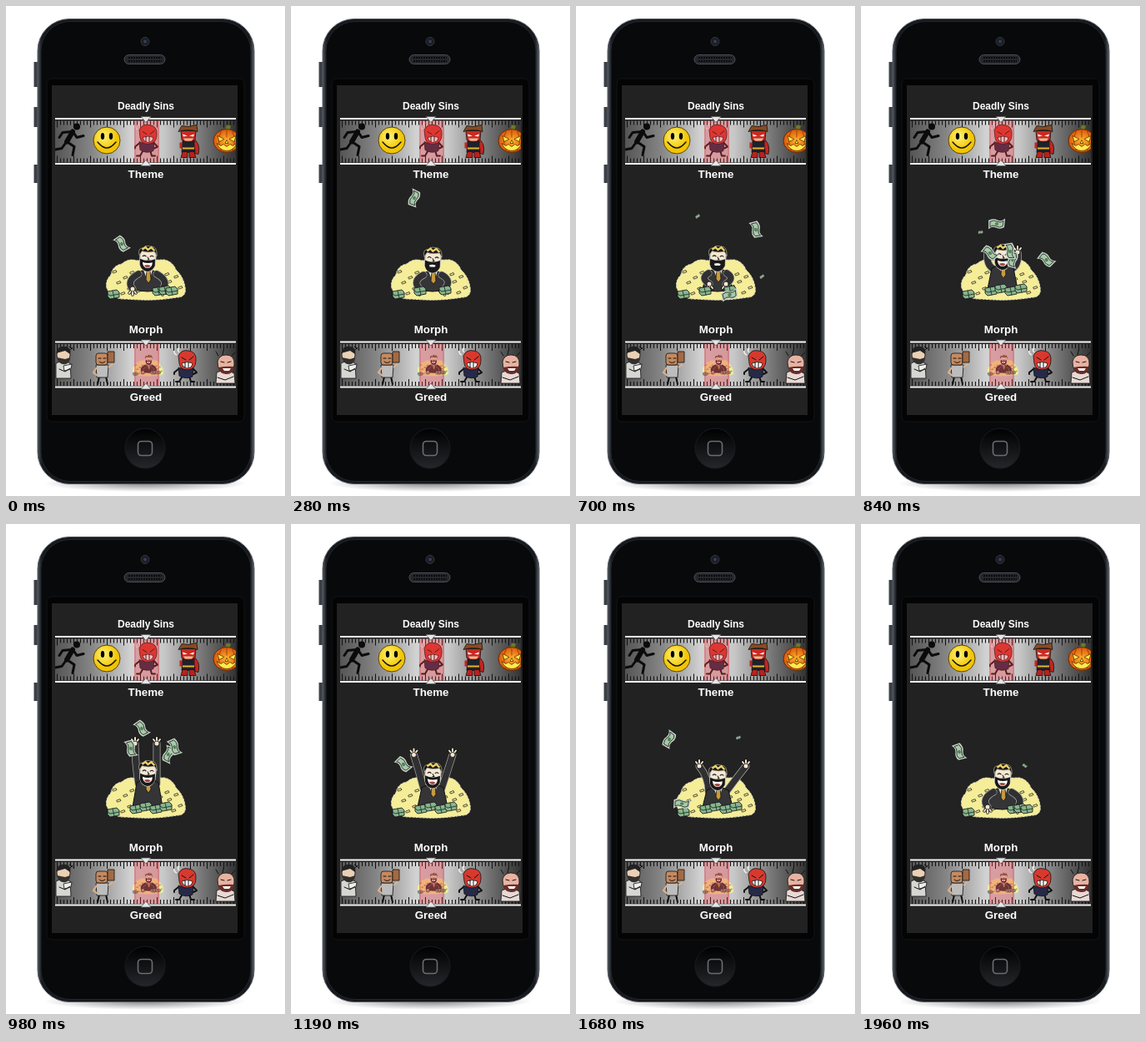
Write an HTML page that moves like this. It is 335x587 px and loops after 2.03 s.

```html
<!DOCTYPE html>
<html lang="en">
<head>
<meta charset="utf-8">
<title>Theme and morph picker</title>
<style>
html, body { margin: 0; width: 100%; height: 100%; overflow: hidden; background: #fff; }
svg { display: block; }
text { font: bold 13.33px "Liberation Sans", Arial, sans-serif; fill: #fff; text-anchor: middle; }
.ink { stroke: #111; stroke-width: .8; stroke-linejoin: round; }
.pen { fill: none; stroke: #111; stroke-linecap: round; stroke-linejoin: round; }
.thick { stroke-width: 2; }
.halo { stroke: #a5a5a0; stroke-width: 9; }
.sleeve { stroke: #303032; stroke-width: 7.5; }
.skin { stroke: #f3e5cf; stroke-width: 2; }
</style>
</head>
<body>
<svg width="335" height="587" viewBox="0 0 335 587">
<defs>
  <linearGradient id="steel">
    <stop offset="0" stop-color="#555"/><stop offset=".2" stop-color="#858585"/>
    <stop offset=".42" stop-color="#d2d2d2"/><stop offset=".6" stop-color="#c8c8c8"/>
    <stop offset=".82" stop-color="#747474"/><stop offset="1" stop-color="#333"/>
  </linearGradient>
  <linearGradient id="rim">
    <stop offset="0" stop-color="#4c525a"/><stop offset=".02" stop-color="#15181c"/>
    <stop offset=".98" stop-color="#15181c"/><stop offset="1" stop-color="#5a6068"/>
  </linearGradient>
  <linearGradient id="home" x2="0" y2="1">
    <stop offset="0" stop-color="#000"/><stop offset="1" stop-color="#24272b"/>
  </linearGradient>
  <radialGradient id="shade">
    <stop offset="0" stop-color="#888"/><stop offset="1" stop-color="#fff"/>
  </radialGradient>
  <radialGradient id="glow">
    <stop offset="0" stop-color="#ffb52e"/><stop offset="1" stop-color="#d9590c"/>
  </radialGradient>
  <radialGradient id="sun" cx=".4" cy=".35">
    <stop offset="0" stop-color="#fff27a"/><stop offset="1" stop-color="#f2c500"/>
  </radialGradient>
  <clipPath id="window"><rect x="59" width="217" height="50"/></clipPath>

  <g id="strip">
    <rect x="59" width="217" height="50" fill="url(#steel)"/>
    <path d="M61 2.5H276M61 47.5H276" stroke="#111" stroke-width="5" stroke-dasharray="1 3"/>
    <path d="M61 4H276M61 46H276" stroke="#111" stroke-width="8" stroke-dasharray="1 19"/>
    <path d="M59 -2.5H276M59 51.5H276" stroke="#f4f4f4" stroke-width="2"/>
  </g>
  <g id="cursor">
    <rect x="154" width="30" height="50" fill="#e8343c" opacity=".32"/>
    <path d="M155 0V50M183 0V50" stroke="#c2444a" opacity=".5"/>
    <path d="M162 -5H174L168 2ZM162 54H174L168 47Z" fill="#e6e6e6" stroke="#555" stroke-width=".7"/>
  </g>

  <g id="angry">
    <path class="pen thick" d="M-2 12L-6 19H-10M6 12L8 19H12M-7 4L-12 8V10M10 3L15 8L11 10"/>
    <path class="ink" d="M-7 2Q1 6 11 1L10 13Q2 17 -6 12Z" fill="#262a48"/>
    <path class="ink" d="M-7 -12Q-3 -20 5 -18Q15 -17 14 -6Q14 4 4 5Q-5 5 -6 -3Z" fill="#d8392e"/>
    <path class="ink" d="M-3 -3Q4 -6 10 -3Q9 3 3 3Q-2 2 -3 -3Z" fill="#fff"/>
    <path class="pen" d="M-3 -10L2 -7M11 -11L6 -7M1 -4V2M5 -4V2"/>
    <path d="M-9 -13q-4 -2 -3 -5M-6 -16q-3 -3 0 -5" fill="none" stroke="#eee" stroke-width="1.6"/>
  </g>
  <g id="runner" fill="none" stroke="#0b0b0b" stroke-linecap="round" stroke-linejoin="round">
    <circle cx="10" cy="-15" r="4" fill="#0b0b0b" stroke="none"/>
    <path d="M5 -9L-2 3" stroke-width="6"/>
    <path d="M4 -9L-7 -8L-11 -2M6 -8L10 -2L18 -4M-2 3L7 9L5 19M-3 4L-8 11L-19 13" stroke-width="3"/>
  </g>
  <g id="smiley">
    <circle r="16" fill="url(#sun)" stroke="#5a4500"/>
    <ellipse cx="-5" cy="-5" rx="2.2" ry="4"/><ellipse cx="5" cy="-5" rx="2.2" ry="4"/>
    <path class="pen" d="M-10 3Q0 15 10 3M-11 2l2 2M11 2l-2 2" stroke-width="1.5"/>
  </g>
  <g id="hero">
    <path class="ink" d="M5 -3Q15 2 12 16L3 14Z" fill="#c32520"/>
    <path class="ink" d="M-7 0H7L8 14H-8Z" fill="#20222b"/>
    <path class="ink" d="M-7 13H-1V20H-9ZM1 13H7L9 20H1Z" fill="#b7221e"/>
    <path d="M-7 9H7" stroke="#e5b52f" stroke-width="2"/>
    <path d="M-9 2V9M9 2V9" stroke="#c32520" stroke-width="3"/>
    <path class="ink" d="M-9 -12H9L8 -1Q0 4 -8 -1Z" fill="#c92a22"/>
    <path d="M-6 -3H6L4 0H-4Z" fill="#e9ba92"/>
    <path d="M-7 -8L-1 -6L-6 -5ZM7 -8L1 -6L6 -5Z" fill="#fff"/>
    <path class="ink" d="M-12 -11L-8 -18L0 -17L10 -19L11 -11Q0 -15 -12 -11Z" fill="#8b4a22"/>
  </g>
  <g id="pumpkin">
    <path d="M-2 -12L0 -19L5 -18L3 -12Z" fill="#6b7a2a"/>
    <ellipse rx="16" ry="14" fill="url(#glow)" stroke="#6b2700"/>
    <path d="M-6 -13Q-13 0 -6 13M6 -13Q13 0 6 13M0 -14V-4" fill="none" stroke="#a33f05"/>
    <path d="M-11 -6L-3 -2L-9 1ZM11 -6L3 -2L9 1ZM0 -1L2 3H-2ZM-12 3L-7 6L-4 4L0 7L4 4L7 6L12 3Q8 12 0 12Q-8 12 -12 3Z" fill="#ffe94d" stroke="#541f00" stroke-width=".7"/>
  </g>
  <g id="eater">
    <path class="ink" d="M-9 5Q0 0 8 5L9 23H-9Z" fill="#d6d6d2"/>
    <ellipse class="ink" cy="-5" rx="8" ry="9" fill="#ead0b4"/>
    <path d="M-9 -7Q-7 -17 3 -15Q10 -13 8 -6L2 -10Z" fill="#222"/>
    <path d="M-8 -2Q-5 8 3 6Q8 4 8 -2L2 0Z" fill="#33302d"/>
    <path class="ink" d="M0 8L10 6L9 12L1 14Z" fill="#eee"/>
    <path class="pen" d="M-5 12L2 15L8 11M7 -15l4 3M11 -14l-3 3"/>
  </g>
  <g id="carrier">
    <path class="pen thick" d="M-5 14L-7 23M3 14L5 23"/>
    <path class="ink" d="M-9 0H6L5 15H-8Z" fill="#bdbdbd"/>
    <path d="M-8 3L-12 9L-7 13M6 3L11 -1" fill="none" stroke="#ddb38c" stroke-width="2"/>
    <rect class="ink" x="-9" y="-14" width="14" height="14" rx="3" fill="#c58a60"/>
    <rect class="ink" x="5" y="-16" width="8" height="13" fill="#a36a45"/>
    <path class="pen" d="M-6 -8h3M0 -8h3M-5 -4Q-2 -1 2 -4"/>
  </g>
  <g id="blusher">
    <path class="ink" d="M-10 7Q0 2 11 8L12 20H-11Z" fill="#e7d9d5"/>
    <path class="ink" d="M-9 -6Q-7 -14 1 -14Q12 -14 11 -2Q9 8 1 8Q-9 7 -9 -6Z" fill="#e8b3a2"/>
    <path d="M-8 1Q2 -1 11 0Q9 10 1 9Q-7 8 -8 1Z" fill="#6a2c25"/>
    <path d="M-3 2H7L5 5H-1Z" fill="#fff"/>
    <path class="pen" d="M-8 -13l-3 -5M-3 -14l1 -5M8 -13l4 -4M-5 -6l4 1M7 -6l-4 1M-9 13L0 16L10 12"/>
  </g>
</defs>

<!-- phone -->
<ellipse cx="167" cy="572" rx="122" ry="10" fill="url(#shade)"/>
<path d="M36 67V97M36 121V145M36 190V212" stroke="#3b4046" stroke-width="5"/>
<rect x="38" y="15.5" width="260" height="557" rx="38" fill="url(#rim)" stroke="#555b63"/>
<rect x="42" y="18.5" width="252" height="551" rx="35" fill="#08090b" stroke="#23272c"/>
<rect x="49" y="87" width="237" height="411" rx="6" fill="#040404" stroke="#121416"/>
<rect x="55" y="95" width="223" height="395" fill="#222"/>
<circle cx="167" cy="42.5" r="5" fill="#1a1d22" stroke="#34383e"/>
<circle cx="167" cy="42.5" r="2" fill="#30405a"/>
<rect x="142" y="58.5" width="49" height="11" rx="5.5" fill="#24272b" stroke="#4a4e54"/>
<path d="M147 62H187M147 66H187" stroke="#0a0a0a" stroke-width="2" stroke-dasharray="2 1"/>
<circle cx="167" cy="530" r="24" fill="url(#home)" stroke="#191c20"/>
<rect x="158.5" y="521.5" width="17" height="17" rx="4" fill="none" stroke="#6a6e74" stroke-width="1.6"/>

<text x="168" y="124" style="font-size:12px">Deadly Sins</text>
<text x="168" y="206">Theme</text>
<text x="168" y="392">Morph</text>
<text x="168" y="473">Greed</text>

<!-- selectors -->
<g transform="translate(0 137.5)">
  <use href="#strip"/>
  <g clip-path="url(#window)">
    <use href="#runner" x="75" y="22"/><use href="#smiley" x="121" y="23.5"/>
    <use href="#angry" x="167" y="23"/><use href="#hero" x="219" y="24"/>
    <use href="#pumpkin" x="265" y="24"/>
  </g>
  <use href="#cursor"/>
</g>
<g transform="translate(0 405)">
  <use href="#strip"/>
  <g clip-path="url(#window)">
    <use href="#eater" x="69" y="18"/><use href="#carrier" x="117" y="25"/>
    <g id="mini" transform="translate(105 -99) scale(.39)"/>
    <use href="#angry" x="214" y="26"/><use href="#blusher" x="263" y="27"/>
  </g>
  <use href="#cursor"/>
</g>
<g id="stage"/>
</svg>

<script>
const STEP = 70, LOOP = 2030, MID = 170;

// time, arm centre, head y, shoulder y, elbow spread and y, hand spread and y
const rest = [170, 303, 319, 26, 329, 18, 339];
const poses = [
  [0, ...rest],
  [490, 169, 306, 321, 23, 329, 13, 339],
  [700, 170, 303, 318, 21, 326, 10, 333],
  [840, 170, 301, 313, 20, 310, 18, 295],
  [980, 168, 299, 309, 13, 286, 13, 263],
  [1120, 170, 301, 314, 17, 295, 22, 273],
  [1400, 173, 303, 317, 16, 303, 27, 287],
  [1680, 176, 304, 318, 17, 304, 28, 290],
  [1820, 172, 304, 319, 24, 319, 31, 316],
  [1960, ...rest],
  [LOOP, ...rest]
];

// time, x, y, turn
const notes = [
  [[0, 139, 285, 55], [280, 128, 339, -20]],
  [[280, 148, 230, -70], [490, 176, 236, -20], [700, 216, 268, 75], [910, 226, 322, 20]],
  [[560, 174, 332, 0], [840, 195, 360, -30]],
  [[840, 182, 304, 100], [1190, 214, 234, 125]],
  [[840, 179, 294, 80], [1050, 214, 254, 60]],
  [[840, 155, 296, 40], [980, 150, 269, 75], [1400, 120, 307, 15], [1750, 129, 342, 0]],
  [[840, 163, 261, 0], [1120, 163, 229, 110]],
  [[1330, 188, 229, 0], [1400, 175, 228, 5], [1680, 112, 258, -60], [1960, 118, 273, 70], [LOOP, 139, 285, 55]]
];

// time, x, y
const scraps = [
  [[420, 148, 229], [700, 146, 252], [980, 141, 290]],
  [[1330, 194, 229], [1680, 195, 256], [LOOP, 197, 298]],
  [[490, 207, 314], [840, 234, 331]]
];

const at = (keys, t) => {
  const i = keys.findIndex(k => k[0] > t);
  if (i < 1) return null;
  const a = keys[i - 1], b = keys[i], p = (t - a[0]) / (b[0] - a[0]);
  return a.map((v, j) => v + (b[j] - v) * p);
};

const bill = (x, y, turn, size) =>
  `<g transform="translate(${x} ${y}) rotate(${turn}) scale(${size})">
    <path d="M-10 -4Q-4 -7 1 -4Q6 -2 10 -5L9 4Q4 7 -1 4Q-6 2 -10 5Z" fill="#a5cba7" stroke="#c8d2c8" stroke-width="2"/>
    <path class="ink" d="M-9 -3Q-4 -6 1 -3Q6 -1 9 -4L8 3Q4 6 -1 3Q-6 1 -9 4Z" fill="#a5cba7"/>
    <ellipse rx="2.5" ry="2" fill="#537d5c"/></g>`;

const stack = (x, y) =>
  `<path class="ink" d="M${x} ${y}l11 -2l3 3v6l-11 2l-3 -3z" fill="#86b58d"/>
   <path class="pen" d="M${x} ${y + 3}l3 2l11 -2M${x + 6} ${y - 1}l2 9" stroke-width=".7"/>`;

// a row of bundles, alternately lifted
const stacks = (count, x, gap, y, lift) =>
  Array.from({ length: count }, (_, i) => stack(x + i * gap, y - i % 2 * lift)).join('');

const mound = (() => {
  let coins = '';
  for (let i = 0; i < 20; i++)
    coins += `M${128 + i * 37 % 82} ${318 + i * 17 % 28}l4 -1.5l1 2l-4 1.5z`;
  return `<path d="M121 338Q119 329 126 322Q128 311 139 309Q147 302 157 305L190 304Q200 306 204 316Q213 324 215 337Q217 349 205 349Q178 354 145 351Q127 352 121 338Z"
    fill="#f5ed98" stroke="#e9e6c9" stroke-dasharray="3 1"/>
    <path class="pen" d="${coins}" stroke-width=".7"/>`;
})();

const arm = (side, centre, sy, ex, ey, hx, hy) => {
  const x = centre + side * hx, up = hy < sy ? -1 : 1;
  const d = `M${MID + side * 11} ${sy + 2}Q${centre + side * ex} ${ey} ${x} ${hy}`;
  const fingers = [-4, 0, 4].map(f => `M${x} ${hy}l${f} ${up * (f ? 5 : 7)}`).join('');
  return `<path class="pen halo" d="${d}"/><path class="pen sleeve" d="${d}"/>
    <path class="pen" d="${fingers}" stroke-width="3.5"/><path class="pen skin" d="${fingers}"/>
    <circle class="ink" cx="${x}" cy="${hy}" r="3" fill="#f3e5cf"/>`;
};

const head = (y, laugh) =>
  `<g transform="translate(${MID} ${y}) rotate(2)">
    <path d="M-9 -7Q-9 -13 0 -13Q9 -13 10 -6L9 7Q6 15 0 15Q-7 14 -9 6Z" fill="#f4e8d4" stroke="#c9c6bd" stroke-width="1.5"/>
    <path d="M-9 0Q0 4 9 0L9 8Q6 15 0 15Q-7 14 -9 7Z" fill="#191919"/>
    ${laugh
      ? '<path d="M-6 4Q0 6 6 4Q6 11 0 11Q-5 11 -6 4Z" fill="#fff"/><path d="M-4 8Q0 6 4 8Q0 13 -4 8Z" fill="#a6483f"/>'
      : '<path d="M-4 6Q0 4 4 6L3 8H-3Z" fill="#eee"/>'}
    <path class="pen" d="M-6 -3Q-4 -5 -2 -3M3 -3Q5 -5 7 -3M0 -2l2 3h-2"/>
    <path d="M-10 -4Q-13 -13 -5 -13Q-2 -17 3 -15Q11 -16 11 -4L8 -9Q0 -7 -7 -9Z" fill="#151515" stroke="#bdb9a5" stroke-width=".7"/>
    <path d="M-7 -11L-3 -14L0 -11L4 -14L8 -10" fill="none" stroke="#e9cf63" stroke-width="2.4"/>
  </g>`;

function scene(t) {
  const [, centre, headY, sy, ...limb] = at(poses, t);
  const laugh = t < 280 || t >= 840;
  const raised = limb[3] < sy;
  const arms = [-1, 1].map(side => arm(side, centre, sy, ...limb)).join('');
  const suit =
    `<path d="M157 ${sy + 1}Q170 ${sy - 7} 183 ${sy + 1}L188 339Q170 345 152 339Z" fill="#353537" stroke="#111"/>
     <path d="M165 ${sy - 3}h11l-5 16z" fill="#f1eee5"/>
     <path class="ink" d="M169 ${sy - 2}h4l1 11l-3 4l-3 -4z" fill="#c99a3c"/>`;
  const piles = t >= 840 && t < 1890 ? stacks(4, 149, 12, 338, 3)
    : laugh ? stacks(3, 176, 8, 338, 1)
    : stacks(2, 148, 30, 338, 1);
  return mound + (raised ? arms + suit : suit + arms) + head(headY, laugh) + stack(122, 342) + piles;
}

const fly = (list, size, t) => list.map(keys => {
  const k = at(keys, t);
  return k ? bill(k[1], k[2], k[3] ?? t / 5, size) : '';
}).join('');

const stage = document.getElementById('stage');
document.getElementById('mini').innerHTML = scene(0);

let shown = -1;
function draw() {
  const t = Math.floor(performance.now() % LOOP / STEP) * STEP;
  if (shown !== t) {
    stage.innerHTML = scene(t) + fly(notes, .9, t) + fly(scraps, .25, t);
    shown = t;
  }
  requestAnimationFrame(draw);
}
draw();
</script>
</body>
</html>
```
